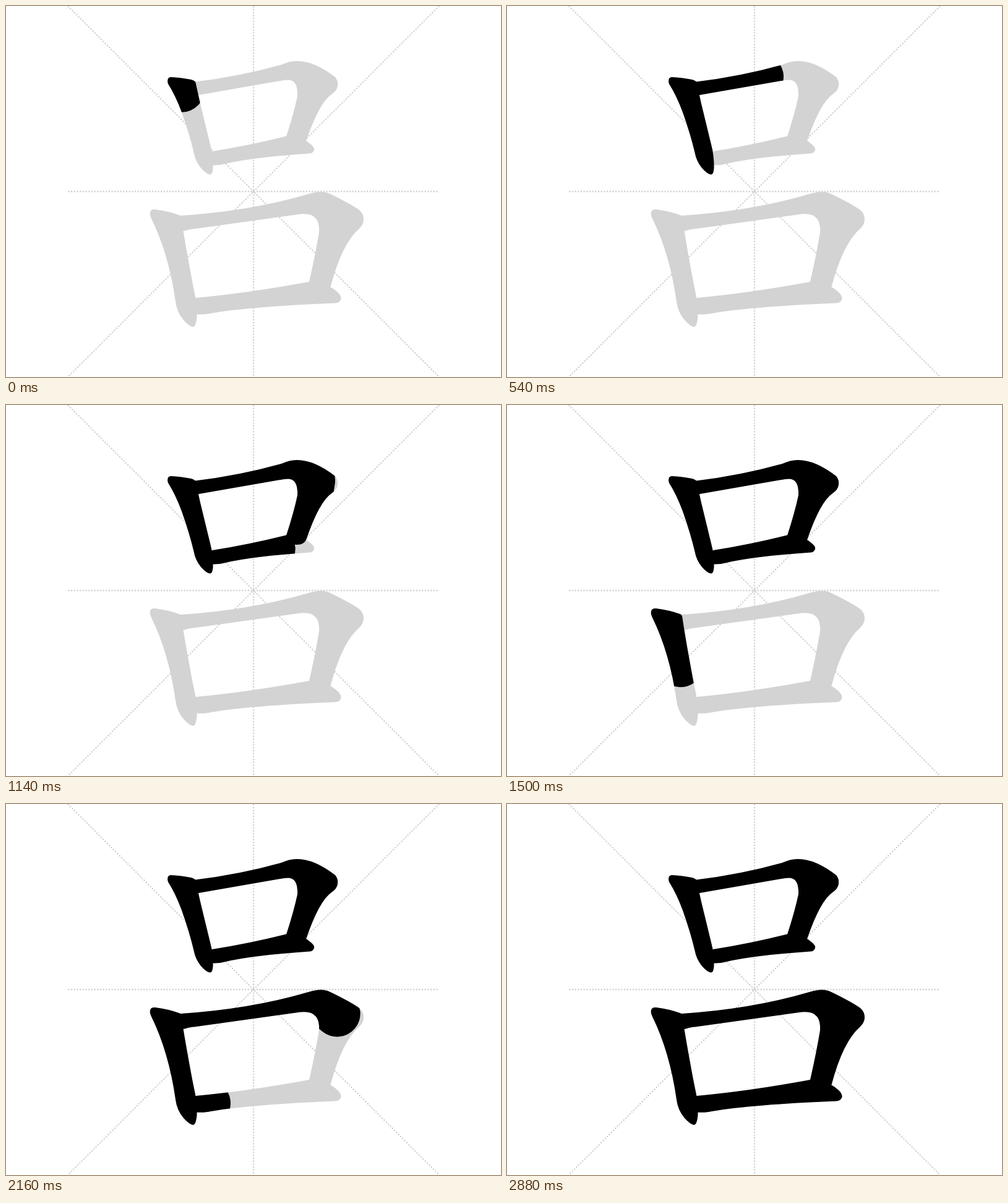
Write an HTML page with a canvas that moves like this. It is 800 by 600 pixels and loops after 2940 ms.

```html
<!DOCTYPE html>
<html lang="zh">
<head>
<meta charset="utf-8">
<title>Stroke order</title>
<style>
html, body { margin: 0; height: 100%; overflow: hidden; background: #fff; }
canvas { display: block; }
</style>
</head>
<body>
<canvas width="800" height="600"></canvas>
<script>
const ctx = document.querySelector('canvas').getContext('2d');
const LOOP = 2940, STEP = 60, BRUSH = 75, CELL = 600 / 256;

// start, full: ms; speed: px per ms along the spine
const strokes = [
  {
    start: -70, speed: 0.273, full: 800,
    outline: 'M262 126Q259 116 266 115Q281 115.500 299 119Q306 121 306.500 124L314 158L331 228Q335 246 334.500 262Q334 272 330 272.500Q325 273 315 262Q306 251 303.500 237Q297 209 284 172Q274 145 262 126Z',
    spine: 'M270 121L284 134.500L299 172L311 212L320 243L329 264'
  },
  {
    start: 275, speed: 0.378, full: 1320,
    outline: 'M303 122.800L306 122.500Q377 114 445 95Q459 88.500 471 89Q498 89 532 115Q537 121 536 129Q535 137 526 143Q506 157 485.500 217Q482 226 470 226Q456 226 453 211Q465 174 471 146Q472 119.500 456 119.500Q451 119.500 440 121.500L311 144L308 144Z',
    spine: 'M311 132.500L320 131L440 108.500L468 104L494.500 122L490 150L468 212'
  },
  {
    start: 800, speed: 0.26, full: 1500,
    outline: 'M331 235.300L333 235Q391 226 453 210.500L478 214Q486 218 493 224Q499 229 498 233Q496 238.500 490 238.500Q397 245 355 255Q344 258 333 257.500Z',
    spine: 'M343 246L400 234L485 230'
  },
  {
    start: 1185, speed: 0.298, full: 2000,
    outline: 'M235 344Q231 336 234 331Q236 328.500 241 329Q264 332 281 338.500Q283 340 283.500 344Q288 376 301.500 448L306 470Q309 489 308.500 503Q307 519 302 519Q296 518 287 508Q276 495 274 478Q263 401 235 344Z',
    spine: 'M241 336L258 352L271 386L281 419.500L290 465L302 512'
  },
  {
    start: 1522, speed: 0.405, full: 2760,
    outline: 'M280 339.200Q394 332 489 304Q511 297 524 304Q557 320 571 330Q578 336 578 345Q578 353 571 360Q543 384 524.500 454Q521 463.500 507 463Q492 463 489 451L490 446Q500 402 506 366Q508 333 476 336.500L304 360.500Q296 361 291 363Q288 364 284 364Z',
    spine: 'M287 351L422 330L480 319L510 318L537.500 341L521 385L507 452'
  },
  {
    start: 2130, speed: 0.318, full: 2880,
    outline: 'M304 472.300L307 472Q393 464 490 446L520 452Q528 456 535 462Q542 468 541.500 474Q539 480.500 532 480.500Q396 486 331 497Q322 499.500 306 498.500Z',
    spine: 'M316 485L400 474L525 469'
  }
].map(s => ({ ...s, outline: new Path2D(s.outline), spine: new Path2D(s.spine) }));

function drawGrid() {
  ctx.strokeStyle = 'lightgray';
  ctx.lineWidth = CELL;
  ctx.lineCap = 'butt';
  ctx.setLineDash([CELL, CELL]);
  for (const [x1, y1, x2, y2] of [[100, 0, 700, 600], [700, 0, 100, 600], [400, 0, 400, 600], [100, 300, 700, 300]]) {
    ctx.beginPath();
    ctx.moveTo(x1, y1);
    ctx.lineTo(x2, y2);
    ctx.stroke();
  }
}

function drawInk(s, t) {
  const reach = (t - s.start) * s.speed;
  if (reach <= 0) return;
  if (t >= s.full) {
    ctx.fill(s.outline);
    return;
  }
  ctx.save();
  ctx.clip(s.outline);
  ctx.strokeStyle = '#000';
  ctx.lineWidth = BRUSH;
  ctx.lineCap = ctx.lineJoin = 'round';
  ctx.setLineDash([reach, 2000]);
  ctx.stroke(s.spine);
  ctx.restore();
}

function draw(now) {
  const t = Math.floor(now % LOOP / STEP) * STEP;
  ctx.clearRect(0, 0, 800, 600);
  drawGrid();
  ctx.fillStyle = 'lightgray';
  strokes.forEach(s => ctx.fill(s.outline));
  ctx.fillStyle = '#000';
  strokes.forEach(s => drawInk(s, t));
}

let begin;
function tick(now) {
  begin ??= now;
  draw(now - begin);
  requestAnimationFrame(tick);
}
requestAnimationFrame(tick);
</script>
</body>
</html>
```
